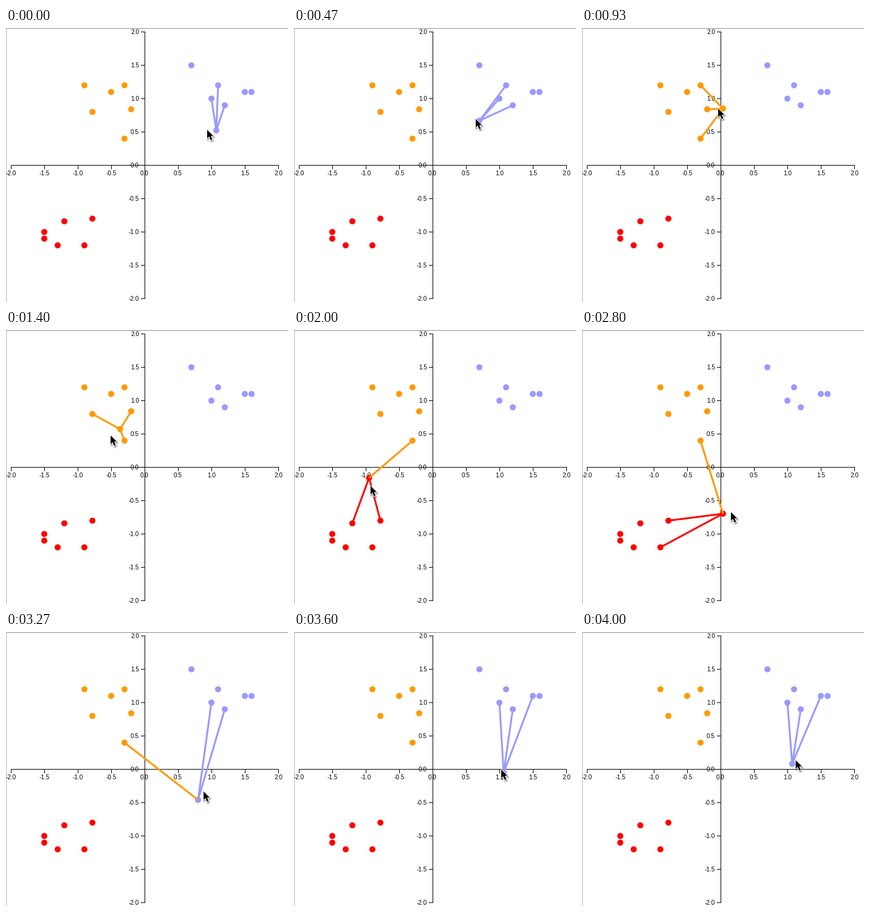
These frames come from a looping animation (464x452 px, 4.07 s). A matplotlib script:

```python
import numpy as np
import matplotlib.pyplot as plt
from matplotlib.animation import FuncAnimation
from matplotlib.lines import Line2D
from matplotlib.patches import Circle, Polygon, Rectangle

W, H, DPI = 464, 452, 64
FRAMES, LOOP_MS = 61, 4070
OX, OY, UNIT = 228, 226.5, 110
PX = 72 / DPI
K = 3

PURPLE, ORANGE, RED = "#9999ff", "#ff9900", "#ff0000"
CLUSTERS = {
    PURPLE: [(0.7, 1.5), (1.1, 1.2), (1, 1), (1.2, 0.9), (1.5, 1.1), (1.6, 1.1)],
    ORANGE: [(-0.9, 1.2), (-0.3, 1.2), (-0.5, 1.1), (-0.78, 0.8),
             (-0.2, 0.84), (-0.3, 0.4)],
    RED: [(-1.2, -0.84), (-0.78, -0.8), (-1.5, -1), (-1.5, -1.1),
          (-1.3, -1.2), (-0.9, -1.2)],
}

# step, dragged point x y, pointer tip x y
KEYS = np.array([
    (0, 346, 169, 331, 168), (2, 316, 181, 309, 193), (4, 304, 202, 303, 206),
    (5.5, 306, 185, 306, 177), (7, 305, 153, 299, 150), (8, 284, 142, 272, 138),
    (11, 248, 134, 238, 134), (16, 215, 138, 209, 139), (19, 199, 152, 190, 161),
    (21, 175, 176, 154, 187), (24, 138, 204, 130, 208), (27, 125, 229, 125, 238),
    (30, 126, 254, 130, 268), (32, 139, 284, 149, 294), (35, 167, 304, 180, 307),
    (40, 222, 304, 235, 301), (42, 242, 302, 255, 300), (46, 284, 300, 295, 296),
    (48, 304, 291, 314, 282), (49, 316, 277, 325, 263), (51, 336, 249, 343, 241),
    (53, 345, 232, 341, 227), (56, 322, 224, 323, 217), (58, 337, 222, 347, 218),
    (60, 355, 212, 354, 203),
], float)
TIMES, PATH = KEYS[:, 0], KEYS[:, 1:]
SLOPES = np.gradient(PATH, TIMES, axis=0)

ARROW = np.array([(0, 0), (0, 14), (3.2, 11), (5.8, 17), (8.4, 15.9),
                  (5.9, 10.1), (10.2, 10.1)])


def path_at(t):
    """Cubic Hermite position of the point and the pointer."""
    i = int(np.clip(np.searchsorted(TIMES, t, "right") - 1, 0, len(TIMES) - 2))
    h = TIMES[i + 1] - TIMES[i]
    s = (t - TIMES[i]) / h
    pos = ((1 + 2 * s) * (1 - s) ** 2 * PATH[i] + s * s * (3 - 2 * s) * PATH[i + 1]
           + h * s * (1 - s) * ((1 - s) * SLOPES[i] - s * SLOPES[i + 1]))
    return pos[:2], pos[2:]


def to_px(x, y):
    return OX + UNIT * x, OY - UNIT * y


fig = plt.figure(figsize=(W / DPI, H / DPI), dpi=DPI, facecolor="white")
ax = fig.add_axes([0, 0, 1, 1])
ax.set_xlim(0, W)
ax.set_ylim(H, 0)
ax.axis("off")


def bar(x, y, w, h, color="black"):
    ax.add_patch(Rectangle((x, y), w, h, fc=color, lw=0, aa=False, zorder=1))


def label(x, y, text, ha):
    ax.text(x, y, text, ha=ha, va="baseline", fontsize=10 * PX,
            family="Liberation Sans", color="black", zorder=1)


def dot(xy, color, z):
    return ax.add_patch(Circle(xy, 5, fc=color, lw=0, zorder=z))


bar(0, 0, W, 1, "#8a8a8a")
bar(0, 0, 1, H, "#b0b0b0")
bar(8, 226, 441, 1)
bar(228, 6, 1, 441)
for v in np.arange(-2, 2.5, 0.5):
    x, y = to_px(v, v)
    bar(int(x), 226, 1, 7)
    bar(222, int(y), 7, 1)
    label(x, 243, f"{v:.1f}", "center")
    label(219, y + 3.7, f"{v:.1f}", "right")

points, colors = [], []
for color, members in CLUSTERS.items():
    for p in members:
        points.append(to_px(*p))
        colors.append(color)
        dot(points[-1], color, 3)
points = np.array(points)

probe = dot((0, 0), PURPLE, 4)
links = [ax.add_line(Line2D([], [], lw=3 * PX, solid_capstyle="butt", zorder=5))
         for _ in range(K)]

# soft shadow layers, then the arrow itself
pointer = []
for width in (5, 3, 1):
    pointer.append((Polygon(ARROW, fc="black", ec="black", lw=width * PX,
                            alpha=0.1, joinstyle="round", zorder=6), (1, 2)))
pointer.append((Polygon(ARROW, fc="black", ec="white", lw=2 * PX, zorder=7), (0, 0)))
pointer.append((Polygon(ARROW, fc="black", lw=0, zorder=8), (0, 0)))
for patch, _ in pointer:
    ax.add_patch(patch)


def draw(i):
    pos, tip = path_at(i)
    near = np.argsort(np.hypot(*(points - pos).T), kind="stable")[:K]
    votes = [colors[n] for n in near]
    probe.center = tuple(pos)
    probe.set_facecolor(max(votes, key=votes.count))
    for line, n in zip(links, near):
        line.set_data([pos[0], points[n, 0]], [pos[1], points[n, 1]])
        line.set_color(colors[n])
    for patch, offset in pointer:
        patch.set_xy(ARROW + tip + offset)
    return [probe, *links, *(p for p, _ in pointer)]


anim = FuncAnimation(fig, draw, frames=FRAMES, interval=LOOP_MS / FRAMES,
                     repeat=True, repeat_delay=0, blit=False)
plt.show()
```
